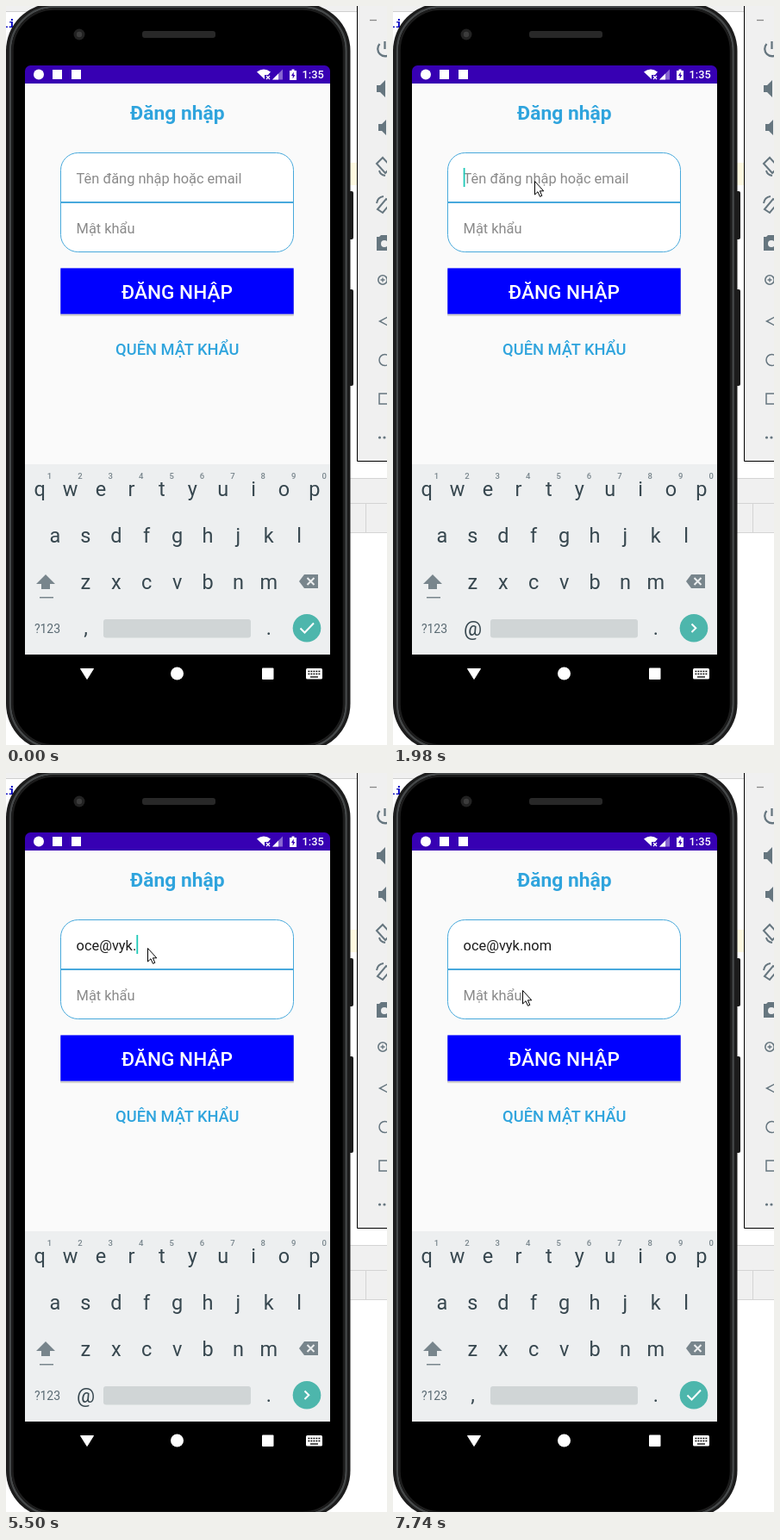
These frames come from a looping animation (442 by 858 pixels, 8000 ms). An HTML page:

```html
<!DOCTYPE html>
<html lang="vi">
<head>
<meta charset="utf-8">
<title>Đăng nhập</title>
<style>
  html, body { margin: 0; width: 100%; height: 100%; overflow: hidden; background: #fff; }
  svg { display: block; width: 100vw; height: 100vh; font-family: Roboto, sans-serif; }
  .mid { text-anchor: middle; }
  .field { font-size: 16.4px; }
  .hint { fill: #8a8a8a; }
  .key { font-size: 23.5px; fill: #37474f; text-anchor: middle; }
  .digit { font-size: 9.5px; font-weight: 500; fill: #78858c; text-anchor: middle; }
  .tool { fill: none; stroke: #66767f; stroke-width: 2; }
  .tool .solid { fill: #66767f; stroke: none; }
  .line { fill: none; stroke: #fff; stroke-width: 2; }
</style>
</head>
<body>
<svg viewBox="0 0 442 858">
  <!-- desktop -->
  <rect width="442" height="858" fill="#fff"/>
  <rect width="442" height="6" fill="#f0f0f0"/>
  <rect y="6" width="442" height="1" fill="#cfcfcf"/>
  <text x="-5" y="24.5" font-family="'DejaVu Sans Mono', monospace" font-size="13" font-weight="700" fill="#0000c0">li</text>
  <rect x="396" y="182" width="12" height="26" fill="#fdf8e0"/>
  <rect x="0" y="548" width="442" height="64" fill="#f0f0f0"/>
  <path d="M0 548.5H442M0 577.5H442M0 611.5H442M417.5 578V611" stroke="#d4d4d4"/>

  <!-- emulator toolbar -->
  <path d="M407.5 -1V528.5H443V-1Z" fill="#f0f0f0" stroke="#000"/>
  <g class="tool">
    <path d="M422 16.5H430" stroke-width="1.3" stroke="#888"/>
    <path d="M433.5 44A8.5 8.5 0 1 0 446 44M439.5 41V50" stroke-width="2.3"/>
    <path class="solid" d="M430 92H434L440 86V106L434 100H430Z"/>
    <path class="solid" d="M432 137H436L441 132V150L436 145H432Z"/>
    <path d="M430 183L437 176L447 187L440 194ZM433 191Q434 196 440 197"/>
    <path d="M431 236L441 224L447 228L437 240ZM430 229Q431 222 438 221"/>
    <path class="solid" d="M430 268H433L435 266H443V284H430Z"/>
    <circle cx="439" cy="276" r="4" fill="#f0f0f0" stroke="none"/>
    <circle cx="437" cy="318" r="5.2" stroke-width="1.6"/>
    <path d="M434.5 318H439.5M437 315.5V320.5" stroke-width="1.3"/>
    <path d="M443 361L433.5 366L443 371" stroke-width="1.5"/>
    <circle cx="439.5" cy="411" r="6.5" stroke-width="1.5"/>
    <rect x="433" y="450" width="13" height="12" stroke-width="1.5"/>
    <circle class="solid" cx="433.5" cy="501" r="1.6"/>
    <circle class="solid" cx="439" cy="501" r="1.6"/>
  </g>

  <!-- phone: dark edge, lighter bevel, black face -->
  <rect x="396" y="215" width="7" height="56" rx="2" fill="#1b1b1b"/>
  <rect x="396" y="329" width="7" height="112" rx="2" fill="#1b1b1b"/>
  <rect x="0" y="-3" width="399.5" height="868" rx="55" fill="#1c1c1c"/>
  <rect x="5" y="1" width="389.5" height="860" rx="51" fill="#000" stroke="#454849" stroke-width="2.5"/>
  <rect x="7.5" y="3.5" width="384.5" height="855" rx="48.5" fill="#000" stroke="#1c1c1c" stroke-width="2.5"/>
  <circle cx="85" cy="33" r="6.5" fill="#222"/>
  <circle cx="85" cy="33" r="3.2" fill="#3c3c3c"/>
  <rect x="158" y="29" width="85" height="8" rx="3" fill="#282828"/>

  <!-- status bar -->
  <rect x="22" y="69" width="354" height="40" rx="6.5" fill="#3700b3"/>
  <rect x="22" y="90" width="354" height="663" fill="#fafafa"/>
  <g fill="#fff">
    <circle cx="38" cy="79.5" r="6"/>
    <rect x="54" y="74" width="11" height="11"/>
    <rect x="76" y="74" width="11" height="11"/>
    <path d="M291 76.5Q299 70.5 307 76.5L304 80H300V85Z"/>
    <path d="M302 81L306 85M306 81L302 85" stroke="#fff" stroke-width="1.3"/>
    <path d="M309 85.5L321 73.5V85.5Z" opacity=".4"/>
    <path d="M309 85.5L316 78.5V85.5Z"/>
    <path d="M329 75H331.5V73.5H334.5V75H337V86H329Z"/>
    <path d="M333.7 76.5L331 81H332.7V84.5L335.3 80H333.7Z" fill="#3700b3"/>
    <text x="343.5" y="84.3" font-size="12.8" font-weight="500">1:35</text>
  </g>

  <!-- form -->
  <text class="mid" x="198.8" y="132" font-size="22.8" font-weight="700" fill="#2fa4dd">Đăng nhập</text>
  <rect x="63.5" y="170.5" width="270" height="115" rx="20" fill="#fff" stroke="#48a9dc"/>
  <path d="M63 228H334" stroke="#48a9dc" stroke-width="2"/>
  <text id="userHint" class="field hint" x="81.6" y="205.5">Tên đăng nhập hoặc email</text>
  <text id="user" class="field" x="81.6" y="205.5" fill="#1c1c1c"></text>
  <text class="field hint" x="81.6" y="263.5">Mật khẩu</text>
  <rect id="userCaret" y="188" width="1.8" height="22" fill="#1fc8b8"/>
  <rect id="passCaret" x="81.7" y="246" width="1.8" height="22" fill="#1fc8b8"/>
  <rect x="63" y="306" width="271" height="54" rx="1" fill="#d2d2d2"/>
  <rect x="63.3" y="304.4" width="270.4" height="53.2" fill="#00f"/>
  <text class="mid" x="198.5" y="340" font-size="22.6" font-weight="500" fill="#fff">ĐĂNG NHẬP</text>
  <text class="mid" x="198.8" y="405" font-size="18.3" font-weight="500" fill="#2fa4dd">QUÊN MẬT KHẨU</text>

  <!-- keyboard -->
  <rect x="22" y="532" width="354" height="221" fill="#edeff0"/>
  <g id="keys"></g>
  <g fill="#78858c">
    <path d="M46 660L57 671H51V677H41V671H35Z"/>
    <rect x="39" y="686" width="16" height="1.5"/>
    <path d="M340 668L346 660H362V676H346Z"/>
    <path d="M349.5 664L357.5 672M357.5 664L349.5 672" stroke="#edeff0" stroke-width="2"/>
  </g>
  <text class="mid" x="48" y="727.5" font-size="14" fill="#5a6a73">?123</text>
  <rect x="113" y="712" width="171" height="21.5" rx="3" fill="#d0d5d6"/>
  <circle cx="349" cy="722.3" r="16.3" fill="#4db6ac"/>
  <g id="doneKeys">
    <text class="key" x="92.5" y="730">,</text>
    <path class="line" d="M341.5 722.5L346.5 727.5L357 716.5"/>
  </g>
  <g id="mailKeys">
    <text class="key" x="92.5" y="730.5">@</text>
    <path class="line" d="M346.5 717.5L351.3 722.3L346.5 727"/>
  </g>

  <!-- navigation bar -->
  <g fill="#fff">
    <path d="M86.5 769.5H101.5L94 781.5Z" stroke="#fff" stroke-linejoin="round"/>
    <circle cx="198.5" cy="775" r="7.5"/>
    <rect x="297" y="768.5" width="13.5" height="13.5" rx="1"/>
    <rect x="348" y="769" width="19" height="12.5" rx="1.5"/>
    <path d="M350.5 772.5H365M350.5 775.5H365" stroke="#000" stroke-width="1.5" stroke-dasharray="1.8 1.2"/>
    <path d="M353 779H362" stroke="#000" stroke-width="1.3"/>
  </g>

  <path id="pointer" d="M.5 .5V16L4 12.7L6.5 18.3L8.8 17.3L6.4 11.8H10.8Z" fill="#fff" stroke="#000"/>
</svg>

<script>
const LOOP = 8000;
const $ = id => document.getElementById(id);

// Each row holds its value from the given time on.
const pointerSteps = [
  [0, null],
  [70, [405, 823]], [130, [290, 540]], [200, [190, 310]], [270, [156, 226]],
  [500, [157, 222]], [580, [160, 213]], [660, [163, 206]], [740, [164, 203]],
  [6420, [163, 206]], [6500, [155, 214]], [6580, [147, 223]], [6660, [144, 230]],
  [6740, [143, 238]], [6820, [145, 245]], [6900, [148, 250]], [6980, [150, 252]]
];
const address = 'oce@vyk.nom';
const typeTimes = [2360, 2610, 2910, 3540, 4170, 4550, 5270, 5500, 5730, 5810, 5890];
const userCaretSteps = [
  [0, 0], [1040, 1], [1500, 0], [1980, 1], [3460, 0], [3540, 1], [4000, 0],
  [4170, 1], [5100, 0], [5270, 1], [6420, 0], [6900, 1], [7130, 0]
];
const passCaretSteps = [[0, 0], [240, 1], [740, 0], [7240, 1], [7740, 0]];
const mailKeySteps = [[0, 0], [890, 1], [7130, 0]];

const valueAt = (steps, t) => steps.findLast(([start]) => start <= t)[1];
const show = (id, on) => $(id).setAttribute('visibility', on ? 'visible' : 'hidden');

function addText(className, x, y, text) {
  const el = document.createElementNS('http://www.w3.org/2000/svg', 'text');
  el.setAttribute('class', className);
  el.setAttribute('x', x);
  el.setAttribute('y', y);
  el.textContent = text;
  $('keys').append(el);
}

function addRow(className, letters, x, y) {
  [...letters].forEach((letter, i) => addText(className, x + i * 35.4, y, letter));
}

addRow('key', 'qwertyuiop', 39.3, 569);
addRow('key', 'asdfghjkl', 57, 622.5);
addRow('key', 'zxcvbnm', 92.4, 676.5);
addRow('key', '.', 304.8, 730);
addRow('digit', '1234567890', 50.5, 549);

function draw() {
  const t = performance.now() % LOOP;
  const typed = address.slice(0, typeTimes.filter(time => time <= t).length);
  if ($('user').textContent !== typed) $('user').textContent = typed;
  $('userCaret').setAttribute('x', 81.7 + (typed ? $('user').getComputedTextLength() : 0));
  show('userHint', !typed);
  show('userCaret', valueAt(userCaretSteps, t));
  show('passCaret', valueAt(passCaretSteps, t));

  const mail = valueAt(mailKeySteps, t);
  show('mailKeys', mail);
  show('doneKeys', !mail);

  const tip = valueAt(pointerSteps, t);
  show('pointer', tip);
  if (tip) $('pointer').setAttribute('transform', `translate(${tip})`);
  requestAnimationFrame(draw);
}
draw();
</script>
</body>
</html>
```
